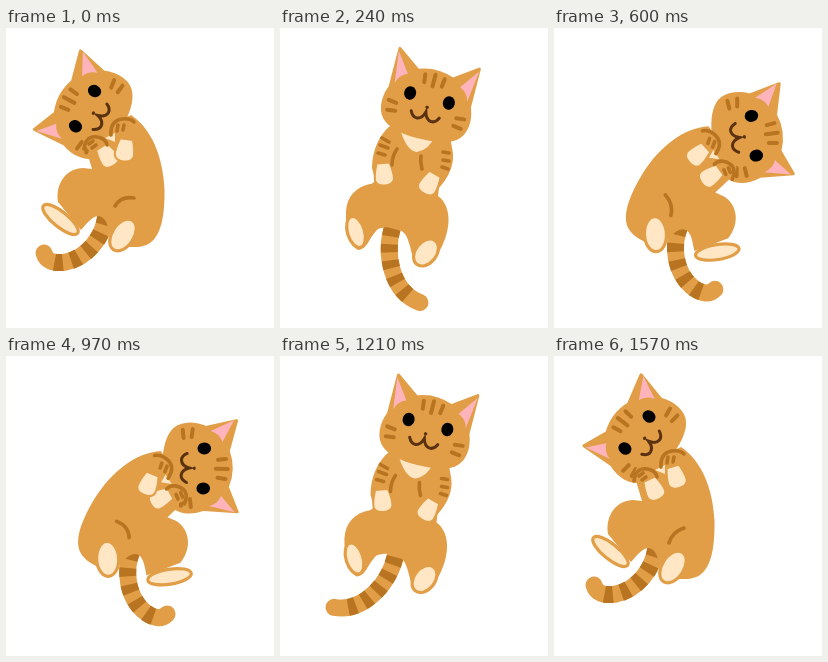
Animation, 268 px wide and 300 px high, one loop 1.94 s. Source, as an HTML page:

```html
<!DOCTYPE html>
<html>
<head>
<meta charset="utf-8">
<title>Rolling cat</title>
<style>
  html, body { margin: 0; width: 100%; height: 100%; overflow: hidden; background: #fff; }
  svg { display: block; width: 100%; height: 100%; }
</style>
</head>
<body>
<svg viewBox="0 0 268 300"><g id="cat"></g></svg>
<script>
const FUR = '#e19e47', DARK = '#b87420', CREAM = '#ffe6c5', PINK = '#ffb4bc', MOUTH = '#5a3210';
const HALF = 970, STEP = 120;

const fill = (d, color) => `<path d="${d}" fill="${color}"/>`;
const line = (d, color = DARK, width = 3.6, extra = 'stroke-linecap="round"') =>
  `<path d="${d}" fill="none" stroke="${color}" stroke-width="${width}" ${extra}/>`;
const shift = (x, y, inner) => `<g transform="translate(${x} ${y})">${inner}</g>`;
const place = (x, y, angle, inner) => `<g transform="translate(${x} ${y}) rotate(${angle})">${inner}</g>`;

const foot = (x, y, angle, rx, ry) => place(x, y, angle,
  `<ellipse rx="${rx}" ry="${ry}" fill="${CREAM}" stroke="${FUR}" stroke-width="3.2"/>`);

const paw = (x, y, angle) => place(x, y, angle,
  `<path d="M-6.500 -11L6.500 -11Q10 0 9.500 6Q8 11.500 0 11.500Q-8 11.500 -9.500 6Q-10 0 -6.500 -11Z" fill="${CREAM}" stroke="${FUR}" stroke-width="2"/>`);

const tail = d => line(d, FUR, 17) +
  line(d, DARK, 17, 'pathLength="100" stroke-dasharray="0 3 9 9 9 9 9 9 9 9 9 99"');

// Head with its origin midway between the eyes; (lx, ly) and (rx, ry) are the ear tips
function head(x, y, angle, [lx, ly, rx, ry]) {
  const pink = (tx, ty, s) =>
    fill(`M${tx - s} ${ty + 4}L${s * 27} -18Q${s * 35} -15 ${s * 37.5} -6Z`, PINK);
  const skull = `M-18 -24Q0 -31 18 -24L${rx - 1.5} ${ry + 1.5}L41 -1C46 12 45 26 36 32.5` +
    `C22 43 -22 43 -36 32.5C-45 26 -46 12 -41 -1L${lx + 1.5} ${ly + 1.5}Z`;
  return place(x, y, angle,
    `<path d="${skull}" fill="${FUR}" stroke="${FUR}" stroke-width="3" stroke-linejoin="round"/>` +
    pink(lx, ly, -1) + pink(rx, ry, 1) +
    line('M0 -24V-12M-10 -22L-9 -14M10 -22L9 -14M-39 12L-31 13M-38 22L-30 21M39 12L31 13M38 22L30 21', DARK, 4) +
    '<ellipse cx="-20" rx="6" ry="6.8"/><ellipse cx="20" rx="6" ry="6.8"/>' +
    `<ellipse cy="9.5" rx="1.8" ry="1.5" fill="${MOUTH}"/>` +
    line('M-14.500 17Q-12 22.500 -7.500 22.500Q-2 22 0 14.500Q2 22 7.500 22.500Q12 22.500 14.500 17', MOUTH, 3));
}

const armsDown = line('M88 122L87 141', FUR, 21) + line('M124 108L119 132', FUR, 20) +
  fill('M97 121L114 109Q112 119 107 124Z', CREAM) +
  paw(88, 150, 8) + paw(118.5, 141, 4) +
  line('M99 128Q93 132 93 139M141 118Q133 121 129 129') +
  line('M77 126L83 122M77 133L82 131M78 139L81 138M119 108L130 110M119 115L127 117M114 122L122 124');

const armsUp = (left, right) => line('M91 118L97 126', FUR, 20) + line('M117 104L120 113', FUR, 20) +
  fill('M101 114L111 109L111 118Z', CREAM) +
  paw(...left) + paw(...right) +
  line('M80 125Q82 109 97 114Q102 116 103 121M107 111Q106 97 118 95Q126 94 130 98') +
  line('M85 120L89 117M88 124L92 121M114 101L113 107M120 101L119 106');

// Curled on the side
function lying({ x = 0, y = 0, face, arms, thigh, sway }) {
  return shift(x, y, tail(sway) +
    fill('M112 98L127 91C148 105 159 133 160.500 165C161 195 156 212 146 219C138 224 130 223 124 223' +
      'L104 206C104 198 99 192 94 192C88 193 84 198 77 206L54 178C51 158 64 144 79 144L88 145L80 118Z', FUR) +
    foot(119, 211, 33, 11, 17.5) + foot(56.5, 195.5, 39, 22, 7.5) +
    line(thigh) + head(...face, [-44, -36, 50, -33]) + arms);
}

// Flat on the back, halfway through the roll
const flat =
  fill('M110 98C100 106 92 122 92 140L95 152C94 156 90 156 86 157C72 162 65 172 66 190C66 205 70 218 78 222' +
    'C88 221 88 211 98 201C106 198 118 199 124 205C130 210 132 232 136 237C150 241 160 226 166 208' +
    'C171 192 169 176 158 168L159 160C168 150 176 136 172 120L170 108Z', FUR) +
  foot(76, 204, -17, 8.5, 16) + foot(146, 224.5, 38, 10.5, 15) +
  fill('M121 104Q127 123 137 124Q149 122 155 108Z', CREAM) +
  paw(104, 146, -5) + paw(149.5, 155.5, 30) +
  line('M117 121Q112 128 112 137M141 128Q140 134 142 141') +
  line('M102 110L109 114M100 117L108 120M98 125L105 127M163 124L169 125M163 132L169 133M162 139L168 141') +
  head(149.5, 70, 14.5, [-42.5, -42, 42.5, -42]);

const thighs = ['M130 174Q117 172 111 182', 'M130 172Q118 176 115 187'];
const tails = [
  'M102 190C100 214 82 234 62 238C50 240 42 237 40 229',
  'M103 190C101 214 78 234 56 234C46 234 40 230 35 224',
  'M104 190C106 215 103 242 82 259',
  'M113 198C104 225 111 264 140 274.500'
];
const rest = [83, 76.5, -53];
const tucked = armsUp([100, 133, -25], [122, 121, -17]);

// slide: extra sideways move when mirrored; still: art that is never mirrored
const poses = [
  { art: lying({ x: -2, y: -4, face: [81, 84.6, -61.5], arms: armsUp([103.5, 132, -33], [121, 126, 8]),
    thigh: thighs[0], sway: tails[0] }), slide: -3.5 },
  { art: lying({ x: 2, y: -1, face: [84, 77, -50], arms: armsDown, thigh: thighs[1], sway: tails[2] }) },
  { art: tail(tails[3]), slide: 2.5, still: flat },
  { art: lying({ face: rest, arms: armsDown, thigh: thighs[1], sway: tails[1] }) },
  { art: lying({ y: 1, face: rest, arms: shift(0, 3, tucked), thigh: thighs[1], sway: tails[0] }) },
  { art: lying({ face: rest, arms: tucked, thigh: thighs[1], sway: tails[0] }) }
];

const cat = document.getElementById('cat');
let shown = -1;

function draw(now) {
  const t = now % (2 * HALF);
  const back = t >= HALF ? 1 : 0;
  const step = Math.min(5, Math.floor((t % HALF) / STEP));
  const key = back * 6 + step;
  if (key === shown) return;
  shown = key;
  const { art, slide = 0, still = '' } = poses[step];
  const right = (step > 2) !== (back === 1);
  const mirror = right ? `translate(${310 + slide} ${83 + slide / 4}) rotate(30) scale(-1 1)` : '';
  cat.innerHTML = `<g transform="${mirror}">${art}</g>` + shift(-1.5 * back, -1.5 * back, still);
}

const start = performance.now();
function loop() {
  draw(performance.now() - start);
  requestAnimationFrame(loop);
}
loop();
</script>
</body>
</html>
```
